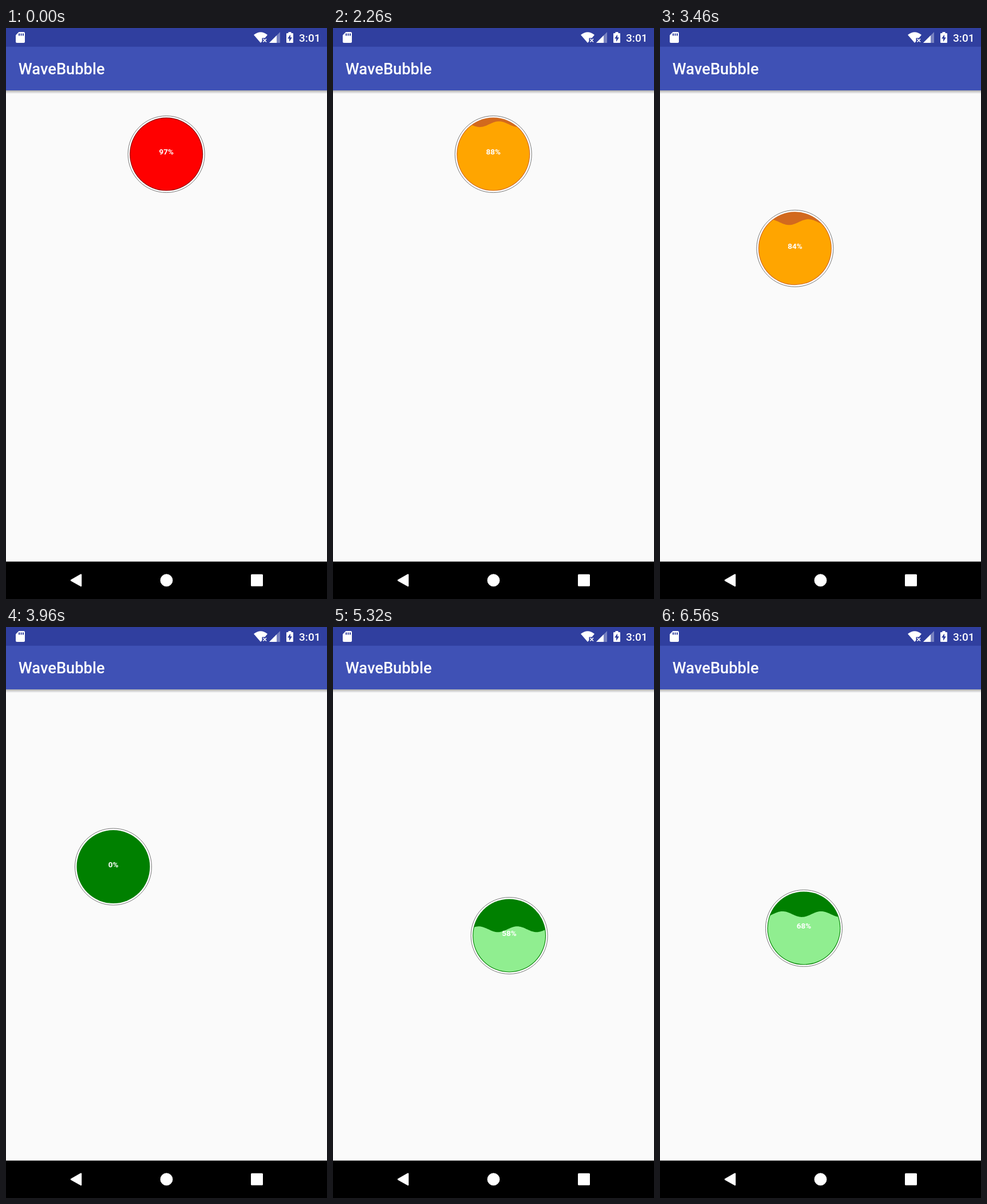
Write an HTML page that moves like this. It is 561 by 998 pixels and loops after 6600 ms.

```html
<!DOCTYPE html>
<html lang="en">
<head>
<meta charset="utf-8">
<title>WaveBubble</title>
<style>
  html, body { margin: 0; width: 100%; height: 100%; overflow: hidden; background: #fafafa; }
  svg { display: block; width: 561px; height: 998px; }
  text { fill: #fff; font-family: Roboto, sans-serif; font-weight: 500; }
  #label { font-size: 13.5px; font-weight: 700; text-anchor: middle; }
</style>
</head>
<body>
<svg viewBox="0 0 561 998">
  <defs>
    <linearGradient id="shade" x2="0" y2="1">
      <stop offset="0" stop-color="#000" stop-opacity=".3"/>
      <stop offset="1" stop-color="#000" stop-opacity="0"/>
    </linearGradient>
    <clipPath id="glass"><circle r="62.9"/></clipPath>
  </defs>

  <rect width="561" height="998" fill="#fafafa"/>
  <rect y="109" width="561" height="6" fill="url(#shade)"/>
  <rect y="32" width="561" height="77" fill="#3f51b5"/>
  <rect width="561" height="32.7" fill="#303f9f"/>
  <text x="21.8" y="81" font-size="27.27">WaveBubble</text>
  <text x="512" y="23.7" font-size="19.1">3:01</text>

  <!-- status icons -->
  <g fill="#fff">
    <path d="M22.5 7H31a2 2 0 0 1 2 2V24a2 2 0 0 1-2 2H19a2 2 0 0 1-2-2V12.5Z"/>
    <path d="M433 12Q445 2.500 457 12L452.500 17.500H447.500V23.200L445 26Z"/>
    <path d="M449.500 19l5.500 5.500m0-5.500l-5.500 5.500" stroke="#fff" stroke-width="1.700"/>
    <path d="M460 26L479 7V26Z" opacity=".35"/>
    <path d="M460 26L473 13V26Z"/>
    <path d="M493.500 9V7h5v2h2.500a1 1 0 0 1 1 1V25a1 1 0 0 1-1 1h-10a1 1 0 0 1-1-1V10a1 1 0 0 1 1-1Z"/>
  </g>
  <g fill="#303f9f">
    <path d="M22 9.500h2v4h-2zM25.500 9.500h2v4h-2zM29 9.500h2v4h-2z"/>
    <path d="M497 11.500V16.500H500L495 24V18.500H492Z"/>
  </g>

  <!-- navigation bar -->
  <rect y="932.6" width="561" height="65.4"/>
  <g fill="#fff" stroke="#fff" stroke-linejoin="round">
    <path d="M114 965.300L131 955.500V975Z" stroke-width="2.500"/>
    <circle cx="280.5" cy="965.300" r="10.500"/>
    <rect x="429.500" y="956.300" width="18" height="18" stroke-width="3"/>
  </g>

  <g id="bubble">
    <circle r="67" fill="#fff" stroke="#555" stroke-width=".8"/>
    <circle id="back" r="64"/>
    <path id="water" clip-path="url(#glass)"/>
    <text id="label" y=".6"></text>
  </g>
</svg>
<script>
const LOOP = 6600;
const RADIUS = 67.5, WAVE = 67.5, AMP = 5;
const DROP = 3860, REFILL = 3956, FILL_TIME = 2205;

// time, x, y of the dragged bubble
const TRACK = [
  [0, 280.2, 220.6], [2520, 280.2, 220.6], [2830, 266.5, 247.5],
  [3080, 258.5, 302.5], [3540, 229.5, 396], [3860, 187.5, 419],
  [3960, 187.5, 419], [4060, 184.3, 440], [4240, 195.3, 494.5],
  [4650, 219.7, 644.4], [4950, 270.5, 596], [5320, 308, 539.5],
  [5550, 328, 536.5], [5650, 328.8, 537.5], [6260, 251.5, 526.5],
  [LOOP, 251.5, 526.5]
];

const el = id => document.getElementById(id);
const [bubble, back, water, label] = ['bubble', 'back', 'water', 'label'].map(el);

function slope(i, axis) {
  const rise = k => (TRACK[k + 1][axis] - TRACK[k][axis]) / (TRACK[k + 1][0] - TRACK[k][0]);
  if (i === 0 || i === TRACK.length - 1) return 0;
  const a = rise(i - 1), b = rise(i);
  return a * b > 0 ? 2 * a * b / (a + b) : 0;
}

// monotone cubic through the track, so the path never overshoots
function place(t, axis) {
  let i = 0;
  while (i < TRACK.length - 2 && t >= TRACK[i + 1][0]) i++;
  const p = TRACK[i], q = TRACK[i + 1], span = q[0] - p[0];
  const u = (t - p[0]) / span, v = 1 - u;
  return p[axis] * v * v * (1 + 2 * u) + q[axis] * u * u * (3 - 2 * u)
    + span * u * v * (slope(i, axis) * v - slope(i + 1, axis) * u);
}

function percentAt(t) {
  if (t < DROP) return 97.9 - t * 0.004;
  const left = 1 - Math.min(1, Math.max(0, (t - REFILL) / FILL_TIME));
  return 68.2 * (1 - left * left);
}

function colours(percent) {
  if (percent >= 90) return ['#8b0000', '#ff0000'];
  if (percent >= 70) return ['#d2691e', '#ffa500'];
  return ['#008000', '#90ee90'];
}

function wavePath(t, percent) {
  const level = RADIUS - percent / 100 * 2 * RADIUS;
  const trough = (t / 1000 + 0.385) * WAVE;
  let d = 'M-66 70';
  for (let x = -66; x <= 66; x += 2) {
    const y = level + AMP * Math.cos((x - trough) / WAVE * 2 * Math.PI);
    d += `L${x} ${y.toFixed(2)}`;
  }
  return d + 'L66 70Z';
}

function draw(t) {
  const percent = percentAt(t);
  const [dark, light] = colours(percent);
  bubble.setAttribute('transform', `translate(${place(t, 1)} ${place(t, 2)})`);
  back.setAttribute('fill', dark);
  water.setAttribute('fill', light);
  water.setAttribute('d', wavePath(t, percent));
  label.textContent = Math.floor(percent) + '%';
}

const start = performance.now();
function tick() {
  draw((performance.now() - start) % LOOP);
  requestAnimationFrame(tick);
}
tick();
</script>
</body>
</html>
```
